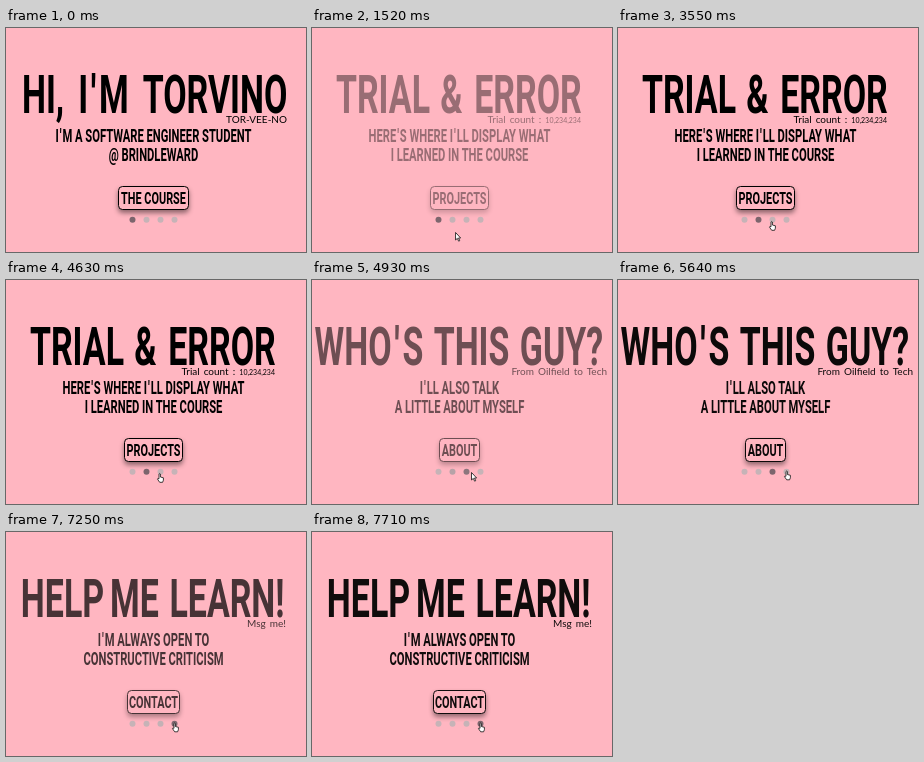
An HTML page that plays this animation: 300 by 224 pixels, repeating every 8 s.

```html
<!DOCTYPE html>
<html lang="en">
<head>
<meta charset="utf-8">
<title>Slideshow</title>
<style>
  html, body { margin: 0; width: 100%; height: 100%; overflow: hidden; background: #ffb6c1; }
  svg { display: block; width: 100vw; height: 100vh; }
  text { text-anchor: middle; }
  .bold { font: bold 17.5px Roboto, "Liberation Sans", sans-serif; }
  .bold.title { font-size: 53px; }
  .bold.label { font-size: 17px; }
  .apostrophe { letter-spacing: .08em; }
  .note { font: 10px Lato, "Open Sans", sans-serif; word-spacing: 1.5px; text-anchor: end; }
  .note .small { font-size: 7px; }
  .button { fill: #ffb6c1; stroke: #000; filter: drop-shadow(0 3px 2.5px rgba(0, 0, 0, .45)); }
  .cursor path { fill: #fff; stroke: #111; stroke-width: .8; stroke-linejoin: round; }
</style>
</head>
<body>
<svg id="stage" viewBox="0 0 300 224"></svg>
<script>
const LOOP = 8000, FADE = 1500, DOT_FADE = 600;
const CENTER = 147.5, CONDENSED = 0.64, BUTTON_TOP = 158.5;

// Title words are [text, center x].
const slides = [
  { start: -5000, title: [["HI,", 37], ["I'M", 97.5], ["TORVINO", 209]],
    note: ["TOR-VEE-NO", 281],
    lines: ["I'M A SOFTWARE ENGINEER STUDENT", "@ BRINDLEWARD"],
    label: "THE COURSE", width: 70 },
  { start: 1510, title: [["TRIAL", 71], ["&amp;", 139.5], ["ERROR", 216]],
    note: ['Trial count : <tspan class="small">10,234,234</tspan>', 269],
    lines: ["HERE'S WHERE I'LL DISPLAY WHAT", "I LEARNED IN THE COURSE"],
    label: "PROJECTS", width: 58 },
  { start: 4640, title: [["WHO'S", 57], ["THIS", 159.5], ["GUY?", 249.5]],
    note: ["From Oilfield to Tech", 295],
    lines: ["I'LL ALSO TALK", "A LITTLE ABOUT MYSELF"],
    label: "ABOUT", width: 40 },
  { start: 6780, title: [["HELP", 56.5], ["ME", 128.5], ["LEARN!", 221]],
    note: ["Msg me!", 280],
    lines: ["I'M ALWAYS OPEN TO", "CONSTRUCTIVE CRITICISM"],
    label: "CONTACT", width: 52 }
];

// Cursor path: time, x, y of its upper left corner.
const moves = [
  [1200, 143, 222], [1520, 143, 204], [2000, 162, 193], [2310, 151, 190],
  [2540, 151, 190], [3170, 151, 192], [3550, 151, 193], [4650, 151, 193],
  [4930, 159, 192], [5390, 166, 190.5], [8000, 166, 190.5]
];
const pointing = t => (t >= 2240 && t < 4700) || t >= 5300;

const spaced = text =>
  text.replace("&amp;", "&").replaceAll("&", "&amp;")
    .replaceAll("'", `<tspan class="apostrophe" dx=".08em">'</tspan>`);

const condensed = (text, x, y, kind = "") =>
  `<text class="bold ${kind}" transform="translate(${x} ${y}) scale(${CONDENSED} 1)">${spaced(text)}</text>`;

const slideMarkup = s => `<g class="slide">
  ${s.title.map(([word, x]) => condensed(word, x, 84.5, "title")).join("")}
  <text class="note" x="${s.note[1]}" y="95">${s.note[0]}</text>
  ${s.lines.map((line, i) => condensed(line, CENTER, 114 + i * 18.5)).join("")}
  <rect class="button" x="${CENTER - s.width / 2}" y="${BUTTON_TOP}" width="${s.width}" height="23" rx="4"/>
  ${condensed(s.label, CENTER, BUTTON_TOP + 17, "label")}
</g>`;

const stage = document.getElementById("stage");
stage.innerHTML = `<rect width="300" height="224" fill="#ffb6c1"/>
  ${slides.map(slideMarkup).join("")}
  ${slides.map((s, i) => `<circle class="dot" cx="${126.5 + i * 14}" cy="191.7" r="3"/>`).join("")}
  <g class="cursor">
    <path class="arrow" d="M.5 .5V8L2.3 6.4 3.6 9.2 4.7 8.7 3.5 6H5.6Z"/>
    <path class="hand" d="M2 1Q2.8 0 3.4 1V4L6.4 4.8V7.2L5.6 9.3H2.7L.5 6.2Q.4 5 2 5.8Z"/>
  </g>`;

const all = name => [...stage.querySelectorAll(name)];
const slideNodes = all(".slide"), dotNodes = all(".dot");
const [cursor] = all(".cursor"), [arrow] = all(".arrow"), [hand] = all(".hand");

const clamp = v => Math.min(1, Math.max(0, v));
const mix = (a, b, k) => a + (b - a) * k;
const show = (node, on) => node.setAttribute("display", on ? "inline" : "none");

// The CSS "ease" curve: cubic-bezier(.25, .1, .25, 1).
function ease(x) {
  const bezier = (u, a, b) => 3 * u * (1 - u) ** 2 * a + 3 * u * u * (1 - u) * b + u ** 3;
  let low = 0, high = 1;
  for (let i = 0; i < 20; i++) {
    const mid = (low + high) / 2;
    if (bezier(mid, .25, .25) < x) low = mid; else high = mid;
  }
  return bezier(low, .1, 1);
}

function dotColor(k) {
  const idle = [198, 179, 183], active = [124, 101, 109];
  return `rgb(${idle.map((c, i) => Math.round(mix(c, active[i], k)))})`;
}

function moveCursor(t) {
  show(cursor, t >= moves[0][0]);
  const i = moves.findIndex(m => m[0] > t);
  if (i < 1) return;
  const [a, b] = [moves[i - 1], moves[i]];
  const k = (t - a[0]) / (b[0] - a[0]);
  cursor.setAttribute("transform", `translate(${mix(a[1], b[1], k)} ${mix(a[2], b[2], k)})`);
  show(hand, pointing(t));
  show(arrow, !pointing(t));
}

function draw(t) {
  const current = slides.filter(s => s.start <= t).length - 1;
  const age = t - slides[current].start;
  const dotShift = ease(clamp(age / DOT_FADE));
  slideNodes.forEach((node, i) => show(node, i === current));
  slideNodes[current].setAttribute("opacity", mix(.4, 1, ease(clamp(age / FADE))));
  dotNodes.forEach((node, i) => {
    const level = i === current ? dotShift : i === current - 1 ? 1 - dotShift : 0;
    node.setAttribute("fill", dotColor(level));
  });
  moveCursor(t);
}

function tick() {
  draw(performance.now() % LOOP);
  requestAnimationFrame(tick);
}
tick();
</script>
</body>
</html>
```
